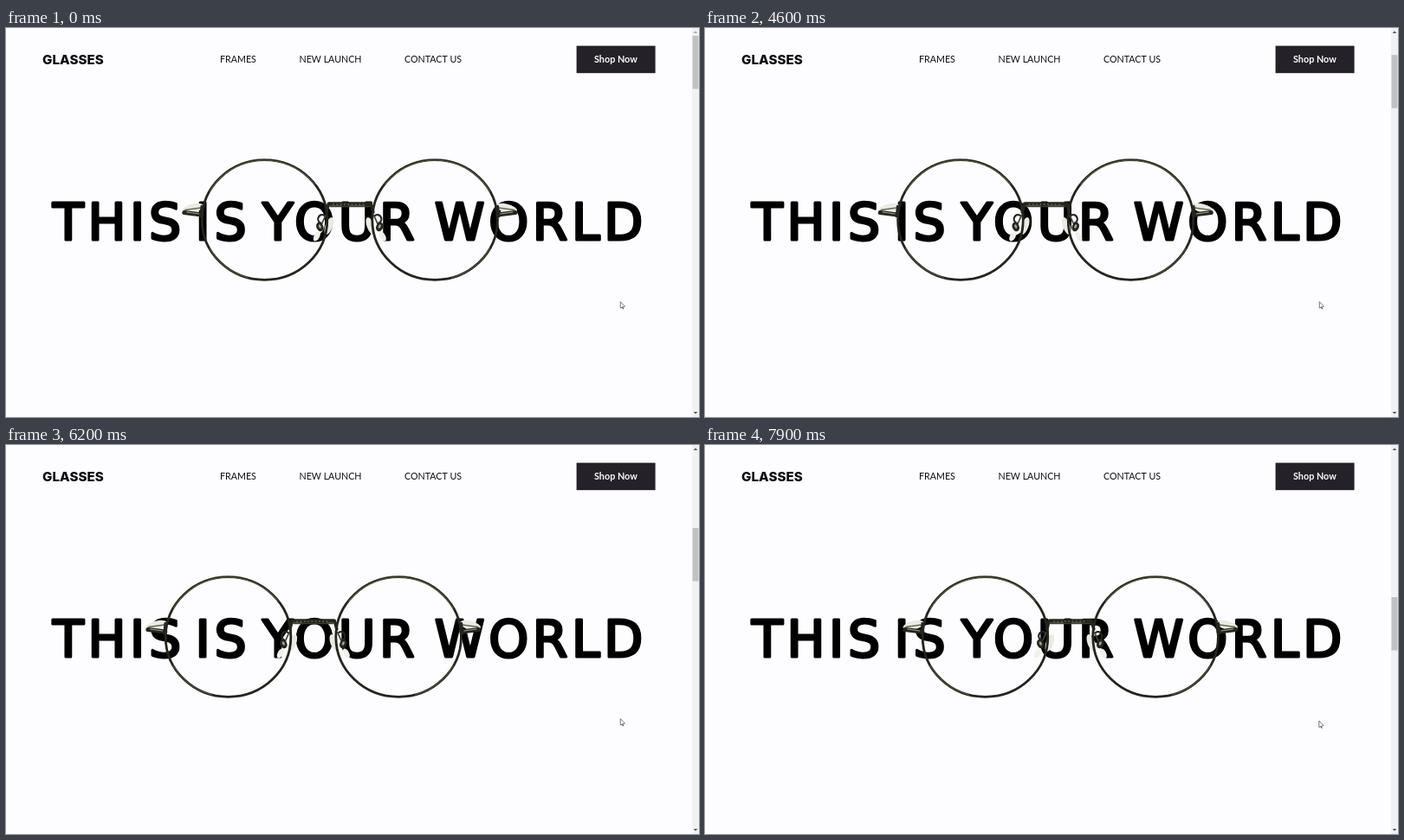
Write an HTML page with a canvas that moves like this. It is 800 by 450 pixels and loops after 8 s.

```html
<!DOCTYPE html>
<html lang="en">
<head>
<meta charset="utf-8">
<title>Glasses</title>
<style>
  html, body { margin: 0; width: 100%; height: 100%; overflow: hidden; background: #fdfcfe; }
  canvas { display: block; width: 800px; height: 450px; }
</style>
</head>
<body>
<canvas id="stage" width="800" height="450"></canvas>
<script>
const ctx = document.getElementById("stage").getContext("2d");
const LOOP = 8000, STEP = 100, TURN = Math.PI * 2;
const DARK = "#26251d", OLIVE = "#77754f", PALE = "#e9ebe2", INK = "#111114";

function ramp(t, start, end) {
  return Math.min(1, Math.max(0, (t - start) / (end - start)));
}

function ease(t, start, end) {
  const u = ramp(t, start, end);
  return u * u * (3 - 2 * u);
}

// Scrolling starts slowly, runs steadily, speeds up, then ends in two nudges.
function thumbTop(t) {
  return 9 + 6 * ramp(t, 3700, 4200) + 81 * ramp(t, 4200, 6200)
    + 64 * ramp(t, 6200, 6700) + 12 * ramp(t, 6900, 7200) + 4 * ramp(t, 7700, 7900);
}

// The glasses glide left in two pulls, swing right, then settle back.
function glassesShift(t) {
  return -48 * ease(t, 4420, 5500) - 31 * ease(t, 5500, 5900)
    + 117 * ease(t, 5900, 6700) - 7.5 * ease(t, 6900, 7200) - 5.5 * ease(t, 7700, 7900);
}

function rect(x, y, w, h, color) {
  ctx.fillStyle = color;
  ctx.fillRect(x, y, w, h);
}

function label(text, x, y, font, color) {
  ctx.font = font;
  ctx.fillStyle = color;
  ctx.fillText(text, x, y);
}

function line(x1, y1, x2, y2, width, color) {
  ctx.beginPath();
  ctx.moveTo(x1, y1);
  ctx.lineTo(x2, y2);
  ctx.lineWidth = width;
  ctx.strokeStyle = color;
  ctx.stroke();
}

function arc(x, y, rx, ry, from, to, width, color) {
  ctx.beginPath();
  ctx.ellipse(x, y, rx, ry, 0, from, to);
  ctx.lineWidth = width;
  ctx.strokeStyle = color;
  ctx.stroke();
}

function oval(x, y, rx, ry, tilt, color) {
  ctx.beginPath();
  ctx.ellipse(x, y, rx, ry, tilt, 0, TURN);
  ctx.fillStyle = color;
  ctx.fill();
}

function drawHeader() {
  const nav = "400 10.7px Lato, sans-serif";
  label("GLASSES", 42, 41.5, "800 15.2px Inter, sans-serif", "#0c0c0e");
  label("FRAMES", 247, 40, nav, INK);
  label("NEW LAUNCH", 338.5, 40, nav, INK);
  label("CONTACT US", 460, 40, nav, INK);
  rect(658.6, 20.6, 91, 31.6, "#242228");
  label("Shop Now", 679, 40, "700 10.8px Lato, sans-serif", "#fbfbfd");
}

// A round outline softens the corners of the letters.
function drawTitleWord(word, center) {
  const m = ctx.measureText(word);
  const x = center - (m.actualBoundingBoxRight - m.actualBoundingBoxLeft) / 2;
  ctx.fillText(word, x, 244.8);
  ctx.strokeText(word, x, 244.8);
}

function drawTitle() {
  ctx.save();
  ctx.font = "400 58.5px 'DejaVu Sans', sans-serif";
  ctx.letterSpacing = "4.6px";
  ctx.fillStyle = ctx.strokeStyle = "#000";
  ctx.lineWidth = 3;
  drawTitleWord("THIS", 126);
  drawTitleWord("IS", 249);
  drawTitleWord("YOUR", 382.5);
  drawTitleWord("WORLD", 614);
  ctx.restore();
}

// One side of the glasses; x grows outward from the bridge.
function drawSide() {
  // temple and hinge
  oval(181, 208.5, 12.5, 5, 0.25, PALE);
  line(172, 208, 190, 210.5, 1.4, "#66665a");
  line(171, 216, 191, 213.5, 5, DARK);
  line(174, 215, 188, 213, 1.1, "#a2a38c");
  line(171, 206, 172.5, 218, 2.4, DARK);

  // nose pad, wire and screw
  oval(24, 229, 4.2, 10.5, -0.35, PALE);
  oval(38, 241, 3.2, 6, -0.5, "#f0f1eb");
  arc(32, 221, 4.5, 5, -2.2, 1.3, 2.2, DARK);
  line(28, 217, 32, 226, 1.8, "#45443a");
  oval(34.5, 230, 4, 5.5, 0.4, DARK);
  oval(34.5, 229.5, 1.4, 2.4, 0.4, "#a5a695");

  // rim
  arc(98.3, 222, 72.3, 69.3, 0, TURN, 2.8, DARK);
  arc(98.3, 222, 72, 69, -2.5, -0.5, 0.8, OLIVE);
  arc(98.3, 222, 72.4, 69.4, 0.5, 1.3, 0.7, OLIVE);
  line(25, 205, 27, 213, 3.6, DARK);
}

function drawBridge() {
  line(-24, 203.5, 24, 203.5, 4.6, DARK);
  line(-23, 206.5, 23, 206.5, 1.4, "#3d3c32");
  for (let x = -19; x < 19; x += 4.3) line(x, 204, x + 0.5, 204, 1.2, "#98967c");
}

function drawGlasses(shift) {
  ctx.save();
  ctx.translate(396.8 + shift, 0);
  for (let side = 0; side < 2; side++) {
    ctx.scale(-1, 1);
    drawSide();
  }
  drawBridge();
  ctx.restore();
}

function drawArrow(y, height, color) {
  ctx.beginPath();
  ctx.moveTo(793.7, y);
  ctx.lineTo(798.3, y);
  ctx.lineTo(796, y + height);
  ctx.fillStyle = color;
  ctx.fill();
}

function drawScrollbar(top) {
  rect(792, 0, 8, 450, "#f1f0f2");
  rect(792.5, top, 7, 61.5, "#c1c0c2");
  drawArrow(6, -2.5, top > 9 ? "#505050" : "#a3a3a3");
  drawArrow(444, 2.5, "#505050");
}

function drawCursor(x, y) {
  ctx.beginPath();
  ctx.moveTo(x, y);
  ctx.lineTo(x, y + 7);
  ctx.lineTo(x + 4.8, y + 5.2);
  ctx.closePath();
  ctx.fillStyle = "#fff";
  ctx.fill();
  ctx.lineWidth = 0.8;
  ctx.strokeStyle = "#55545a";
  ctx.stroke();
  line(x + 2.4, y + 6, x + 3.2, y + 7.8, 1.2, "#55545a");
}

function draw(t) {
  rect(0, 0, 800, 450, "#fdfcfe");
  ctx.lineJoin = ctx.lineCap = "round";
  drawHeader();
  drawTitle();
  drawGlasses(glassesShift(t));
  drawScrollbar(thumbTop(t));
  const nudge = t < 6600 ? 0 : 1;
  drawCursor(709.3 - 0.5 * nudge, 317 + 2.5 * nudge);
}

function tick() {
  const t = performance.now() % LOOP;
  draw(Math.floor(t / STEP) * STEP);
  requestAnimationFrame(tick);
}
tick();
</script>
</body>
</html>
```
